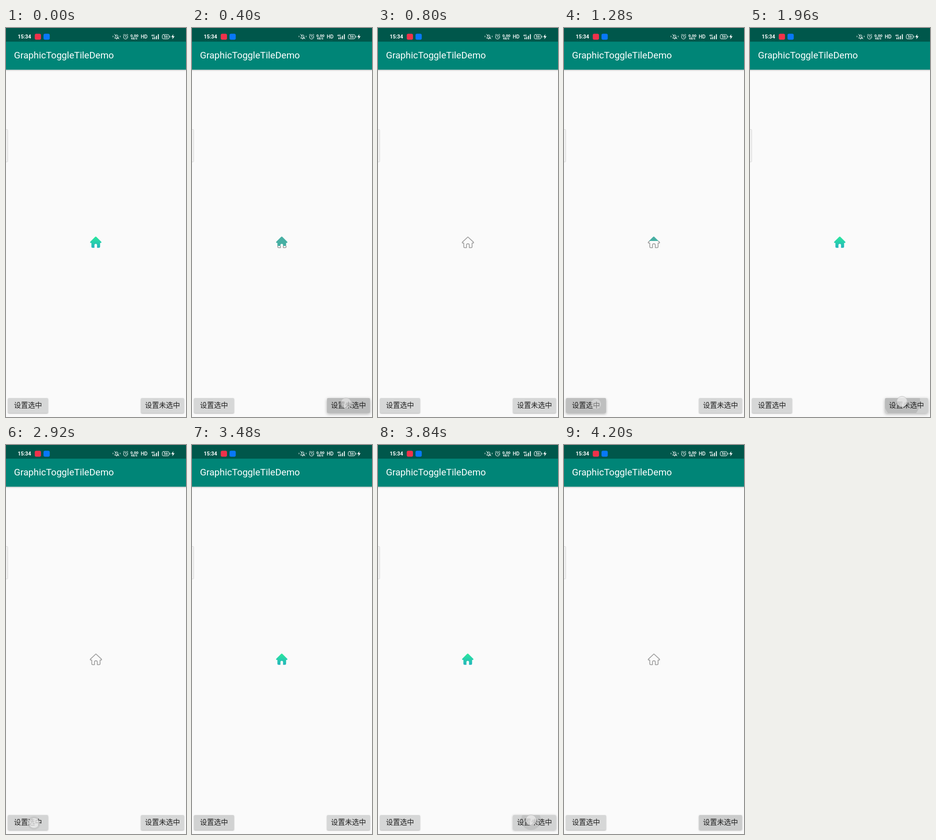
An HTML page for the animation above (4240 ms loop, 360 by 780 pixels).

```html
<!DOCTYPE html>
<html lang="zh-CN">
<head>
<meta charset="utf-8">
<title>Toggle demo</title>
<style>
  html, body { margin: 0; width: 100%; height: 100%; overflow: hidden; background: #fafafa; }
  svg { display: block; width: 360px; height: 780px; font-family: Roboto, "Noto Sans", sans-serif; }
  .status { fill: #fff; font-weight: 700; }
  .line { fill: none; stroke: #fff; stroke-linecap: round; stroke-linejoin: round; }
  .label { font: 400 14px "Noto Sans CJK SC", "Noto Sans CJK", sans-serif; fill: #1c1c1c; }
</style>
</head>
<body>
<svg viewBox="0 0 360 780">
  <defs>
    <linearGradient id="mint" x1="0" y1="0" x2="0" y2="1">
      <stop offset="0" stop-color="#2ae89c"/>
      <stop offset="1" stop-color="#25b5bd"/>
    </linearGradient>
    <linearGradient id="shade" x1="0" y1="0" x2="0" y2="1">
      <stop offset="0" stop-opacity=".2"/>
      <stop offset="1" stop-opacity="0"/>
    </linearGradient>
    <clipPath id="leftClip"><rect x="4" y="742" width="80" height="30" rx="2"/></clipPath>
    <clipPath id="rightClip"><rect x="270" y="742" width="86" height="30" rx="2"/></clipPath>
    <clipPath id="filledClip"><rect id="filledArea" x="164" y="416" width="32"/></clipPath>
    <clipPath id="outlineClip"><rect id="outlineArea" x="164" width="32"/></clipPath>
  </defs>

  <rect width="360" height="780" fill="#fafafa"/>
  <rect y="83" width="360" height="4" fill="url(#shade)"/>
  <rect y="27" width="360" height="56.6" fill="#008577"/>
  <rect width="360" height="27.4" fill="#00574b"/>
  <text x="16" y="61" font-size="18.7" fill="#fff">GraphicToggleTileDemo</text>

  <g class="status">
    <text x="23.5" y="21" font-size="10.4">15:34</text>
    <rect x="57.5" y="11.5" width="12.5" height="12" rx="3" fill="#f0324b"/>
    <rect x="75" y="11.5" width="12.5" height="12" rx="3" fill="#0878f8"/>
    <text x="248.7" y="17.5" font-size="8.1">0.00</text>
    <text x="250.3" y="23" font-size="5.4">KB/S</text>
    <text x="269.5" y="21.2" font-size="10" font-weight="500">HD</text>
    <text x="290.5" y="17" font-size="5.5">4G</text>
    <path d="M293 19h1.8v3.5H293zM296.5 18h1.8v4.5h-1.8zM300 15.5h1.8v7H300zM303.8 12.5h1.8v10h-1.8z"/>
    <text x="315.2" y="20.2" font-size="7.4" font-weight="500">56</text>
    <path d="M334.7 12.2l-4.2 6h3l-1 4.5 4.7-6.2h-3.2z"/>
  </g>
  <g class="line">
    <path d="M217.5 20c1-1 1.2-2 1.2-3.6a2.6 2.6 0 0 1 5.2 0c0 1.6.2 2.6 1.2 3.6zM220.3 21.9h2M217 12.5l8.8 9.5"/>
    <path d="M214 16v2M228.3 16v2"/>
    <circle cx="239.3" cy="18" r="4.1"/>
    <path d="M239.3 15.8v2.4l1.6 1M234.7 14l1.8-1.6M243.9 14l-1.8-1.6"/>
    <rect x="312.5" y="13.2" width="13.6" height="8.6" rx="2.5"/>
    <path d="M328 16.2v2.4"/>
  </g>

  <rect x="-2" y="203.5" width="5.5" height="65" rx="1" fill="#f2f2f2" stroke="#d9d9d9"/>

  <path clip-path="url(#outlineClip)" fill="none" stroke="#999" stroke-width="1.5" stroke-linejoin="round" stroke-linecap="round"
    d="M179.8 419L168.7 429.4Q168 431 169.5 431.3H171.5V438.6Q171.5 440.6 173.5 440.6H177V435.5Q177 432.5 179.8 432.5T182.6 435.5V440.6H186.2Q188.2 440.6 188.2 438.6V431.3H190.2Q191.7 431 191 429.4Z"/>
  <path id="house" clip-path="url(#filledClip)"
    d="M178.3 418.8Q179.5 417.8 180.7 418.8L190.4 428.4Q191.7 430.8 189.3 431H188.2V438.6Q188.2 440.8 186 440.8H182.1V435.3Q182.1 432.8 179.5 432.8T176.9 435.3V440.8H173Q170.8 440.8 170.8 438.6V431H169.7Q167.3 430.8 168.6 428.4Z"/>

  <g id="left">
    <rect class="face" x="4" y="742" width="80" height="30" rx="2" fill="#d6d7d7"/>
    <g clip-path="url(#leftClip)"><rect class="tint" x="4" y="742" width="80" height="30"/><circle class="ripple"/></g>
    <text class="label" x="16" y="761">设置选中</text>
  </g>
  <g id="right">
    <rect class="face" x="270" y="742" width="86" height="30" rx="2" fill="#d6d7d7"/>
    <g clip-path="url(#rightClip)"><rect class="tint" x="270" y="742" width="86" height="30"/><circle class="ripple"/></g>
    <text class="label" x="278" y="761">设置未选中</text>
  </g>
  <circle id="touch" r="10.5" fill="#eee" fill-opacity=".75" stroke="#bbb" stroke-opacity=".8"/>
</svg>
<script>
const LOOP = 4240, SWITCH = 300, FADE = 450, TOUCH_FADE = 260;
const presses = [
  { side: "right", down: 220, up: 340, x: 308, y: 752 },
  { side: "left", down: 1040, up: 1160, x: 64, y: 754 },
  { side: "right", down: 1850, up: 1980, x: 304, y: 749 },
  { side: "left", down: 2880, up: 3100, x: 56, y: 758 },
  { side: "right", down: 3780, up: 3900, x: 306, y: 752 }
];
const $ = id => document.getElementById(id);
const clamp = v => Math.max(0, Math.min(1, v));
const set = (el, attrs) => { for (const k in attrs) el.setAttribute(k, attrs[k]); };

function drawButton(side, t) {
  const press = presses.filter(p => p.side === side && p.down <= t).pop();
  const age = press ? t - press.down : 0;
  const fade = press ? 1 - clamp((t - press.up) / FADE) : 0;
  const lift = press ? clamp(age / 100) * (1 - clamp((t - press.up - 100) / 250)) : 0;
  const find = name => $(side).querySelector("." + name);
  find("face").style.filter =
    `drop-shadow(0 ${1 + lift * 1.5}px ${1 + lift * 2}px rgba(0,0,0,.3))`;
  set(find("tint"), { opacity: .06 * clamp(age / 200) * fade });
  set(find("ripple"), {
    cx: press ? press.x : 0, cy: press ? press.y : 0,
    r: 85 * clamp(age / 260), opacity: .1 * clamp(age / 80) * fade
  });
}

function draw(t) {
  const last = presses.filter(p => p.up <= t).pop();
  const progress = last ? clamp((t - last.up) / SWITCH) : 1;
  const filled = !last || last.side === "left" ? progress : 1 - progress;
  const edge = 417 + 25 * filled;
  set($("filledArea"), { height: edge - 416 });
  set($("outlineArea"), { y: edge, height: 444 - edge });
  // The house looks muted while it is switching.
  set($("house"), { fill: progress < 1 ? "#47afa3" : "url(#mint)" });
  drawButton("left", t);
  drawButton("right", t);

  const touch = presses.find(p => t >= p.down && t < p.up + TOUCH_FADE);
  set($("touch"), touch
    ? { cx: touch.x, cy: touch.y, opacity: 1 - clamp((t - touch.up) / TOUCH_FADE) }
    : { opacity: 0 });
}

const start = performance.now();
function frame() {
  draw((performance.now() - start) % LOOP);
  requestAnimationFrame(frame);
}
frame();
</script>
</body>
</html>
```
